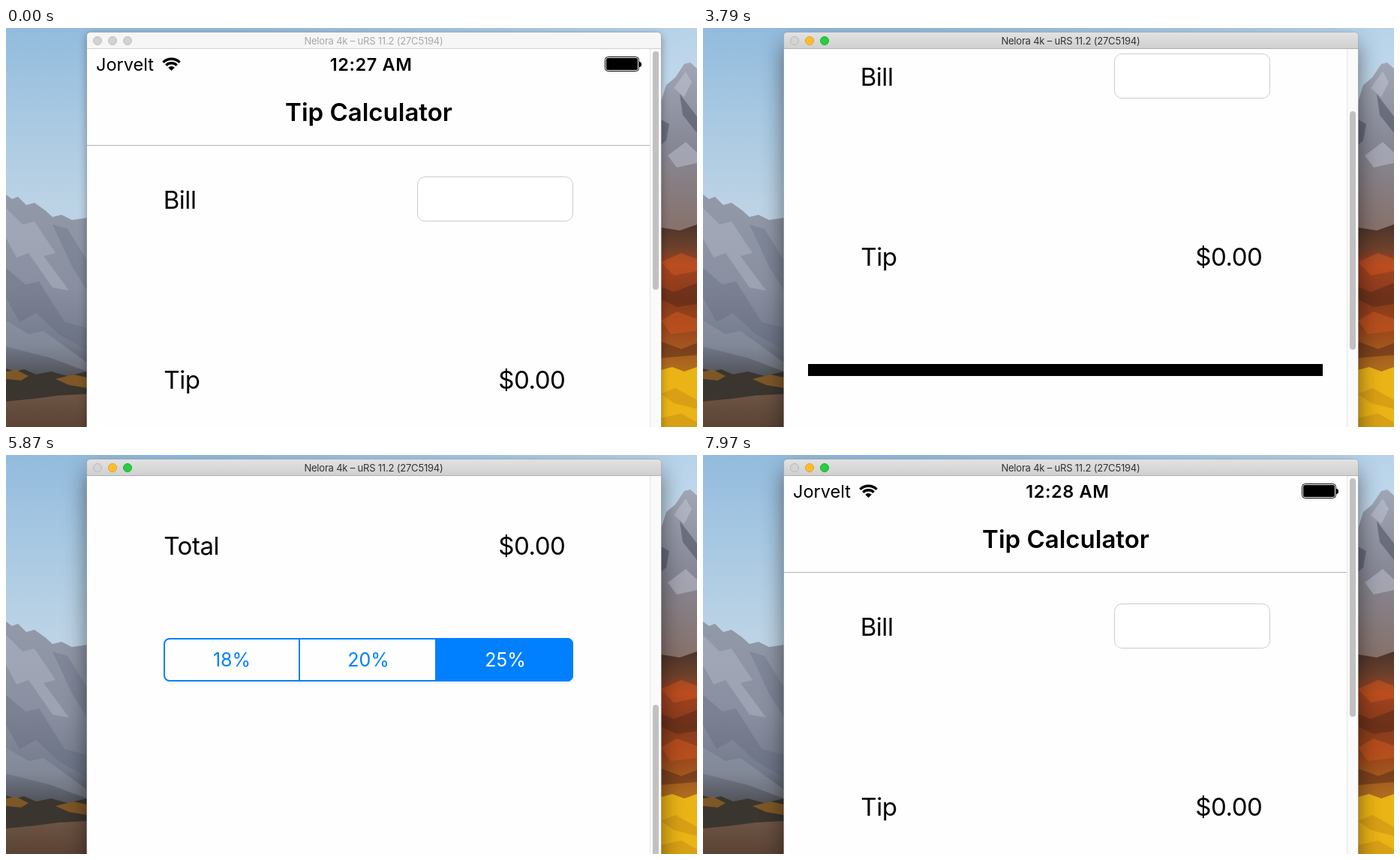
Write an HTML page that moves like this. It is 921x532 px and loops after 8000 ms.

```html
<!DOCTYPE html>
<html lang="en">
<head>
<meta charset="utf-8">
<title>Tip Calculator</title>
<style>
  html, body { margin: 0; width: 100%; height: 100%; overflow: hidden; }
  svg { display: block; width: 921px; height: 532px; font-family: Inter, Roboto, sans-serif; }
  .body { font-size: 33px; letter-spacing: -.45px; }
  .head { font-size: 33px; font-weight: 600; }
  .status { font-size: 23.5px; }
  .clock { font-weight: 600; letter-spacing: .6px; }
  .seg { font-size: 25px; fill: #0080ff; }
  .bar { font-size: 13px; letter-spacing: -.2px; }
  .mid { text-anchor: middle; }
  .end { text-anchor: end; }
</style>
</head>
<body>
<svg viewBox="0 0 921 532">
  <defs>
    <linearGradient id="sky" x2="0" y2="1">
      <stop offset="0" stop-color="#92bbdd"/><stop offset=".2" stop-color="#a6c7e2"/>
      <stop offset=".45" stop-color="#bcd3e5"/>
    </linearGradient>
    <linearGradient id="haze">
      <stop offset=".3" stop-color="#fff" stop-opacity="0"/><stop offset="1" stop-color="#fff" stop-opacity=".35"/>
    </linearGradient>
    <linearGradient id="peak" x2="0" y2="1">
      <stop offset="0" stop-color="#9299a8"/><stop offset=".5" stop-color="#898fa0"/>
      <stop offset=".8" stop-color="#747b8c"/><stop offset="1" stop-color="#4c4d52"/>
    </linearGradient>
    <linearGradient id="ground" x2="0" y2="1">
      <stop offset="0" stop-color="#6d5444"/><stop offset="1" stop-color="#5a4335"/>
    </linearGradient>
    <linearGradient id="cliff" x2="0" y2="1">
      <stop offset="0" stop-color="#a0a6b6"/><stop offset=".5" stop-color="#868795"/>
      <stop offset="1" stop-color="#87716a"/>
    </linearGradient>
    <linearGradient id="slope" x2="0" y2="1">
      <stop offset="0" stop-color="#4b342a"/><stop offset=".15" stop-color="#6b402c"/>
      <stop offset=".28" stop-color="#a3421f"/><stop offset=".5" stop-color="#873a1b"/>
      <stop offset=".7" stop-color="#9a451c"/><stop offset="1" stop-color="#b0701f"/>
    </linearGradient>
    <linearGradient id="chrome" x2="0" y2="1">
      <stop offset="0" stop-color="#e2e2e2"/><stop offset="1" stop-color="#d0d0d0"/>
    </linearGradient>
    <filter id="blurIdle" x="-20%" y="-20%" width="140%" height="140%"><feGaussianBlur stdDeviation="6"/></filter>
    <filter id="blurLive" x="-20%" y="-20%" width="140%" height="140%"><feGaussianBlur stdDeviation="15"/></filter>
    <clipPath id="view"><rect x="108" y="28" width="765" height="504"/></clipPath>
  </defs>

  <g id="scenery">
    <rect width="921" height="532" fill="url(#sky)"/>
    <rect width="921" height="532" fill="url(#haze)"/>
    <path d="M0 222 8 228 16 225 27 236 38 233 52 243 62 252 74 249 88 256 108 253V470H0Z" fill="url(#peak)"/>
  </g>

  <rect id="idleShade" x="108" y="9" width="765" height="560" rx="5" opacity=".35" filter="url(#blurIdle)"/>
  <rect id="liveShade" x="108" y="22" width="765" height="560" rx="5" opacity=".5" filter="url(#blurLive)"/>

  <path d="M107.500 540V11a5.500 5.500 0 0 1 5.500-5.500H868a5.500 5.500 0 0 1 5.500 5.500V540" fill="#fefefe" stroke="#000" stroke-opacity=".2"/>
  <path id="titleBar" d="M108 27V11a5 5 0 0 1 5-5H868a5 5 0 0 1 5 5V27Z"/>
  <path id="barEdge" d="M108 27.500H873"/>
  <g id="lights"></g>
  <text id="caption" class="bar mid" x="490" y="22">Nelora 4k – uRS 11.2 (27C5194)</text>

  <g clip-path="url(#view)">
    <g id="page">
      <text class="status" x="120" y="57">Jorvelt</text>
      <g id="wifi" fill="none" stroke="#000" stroke-width="3.400"></g>
      <text id="clock" class="status clock end" x="541.500" y="57"></text>
      <rect x="798.500" y="38.500" width="45" height="19" rx="4" fill="none" stroke="#000"/>
      <rect x="800" y="40" width="42" height="16" rx="2.500"/>
      <path d="M844 45q3 0 3 3.500t-3 3.500Z"/>
      <text class="head mid" x="483.500" y="124">Tip Calculator</text>
      <path d="M108 156.500H858" stroke="#b3b3b3"/>
      <text class="body" x="209.700" y="241">Bill</text>
      <rect x="548.500" y="198.500" width="207" height="59" rx="10" fill="#fff" stroke="#cbcbcb"/>
      <text class="body" x="210.300" y="481">Tip</text>
      <text class="body end" x="745.500" y="481">$0.00</text>
      <rect x="140" y="612" width="686" height="16"/>
      <text class="body" x="210.300" y="751">Total</text>
      <text class="body end" x="745.500" y="751">$0.00</text>
      <g fill="none" stroke="#0080ff" stroke-width="2">
        <rect x="211" y="863" width="544" height="56" rx="7"/>
        <path d="M391 863V919"/>
        <path d="M573 863H748a7 7 0 0 1 7 7V912a7 7 0 0 1-7 7H573Z" fill="#0080ff"/>
      </g>
      <text class="seg mid" x="301" y="900">18%</text>
      <text class="seg mid" x="483" y="900">20%</text>
      <text class="seg mid" x="665.500" y="900" style="fill:#fff">25%</text>
    </g>
    <rect x="858" y="28" width="15" height="504" fill="#fafafa"/>
    <path d="M858.500 28V532" stroke="#e6e6e6"/>
    <rect id="thumb" x="862" width="8" height="318" rx="4" fill="#c1c1c1"/>
  </g>
</svg>
<script>
const LOOP = 8000, WAKE = 500;
// [time, scroll offset]: the screen holds each offset until the next
const scroll = [[0, 0], [2890, 11], [3040, 46], [3790, 164], [3930, 276], [4380, 279],
  [4530, 350], [4680, 551], [4830, 608], [4980, 619], [5870, 618], [6020, 616],
  [6320, 615], [6470, 614], [7520, 514], [7670, 300], [7820, 97], [7970, 0]];

const $ = id => document.getElementById(id);
const set = (el, attrs) => { for (const k in attrs) el.setAttribute(k, attrs[k]); return el; };
const add = (parent, tag, attrs) =>
  parent.appendChild(set(document.createElementNS('http://www.w3.org/2000/svg', tag), attrs));
const shape = (d, fill, opacity = 1) => add($('scenery'), 'path', { d, fill, opacity });

// Left hillside
shape('M0 240 22 262 38 258 66 300 50 304 84 350 62 346 30 300 14 306 0 280Z', '#b9bfcc', .4);
shape('M0 320 26 342 44 338 78 392 108 400V430L70 408 40 380 18 392 0 360Z', '#5a6274', .3);
shape('M62 262 82 268 108 310V350L88 318Z', '#5f687b', .3);
shape('M0 390 30 408 50 404 108 446V458L60 440 0 425Z', '#a3a9b7', .3);
shape('M0 454 12 458 24 455 40 462 60 458 82 464 108 458V500H0Z', '#3a352f');
shape('M0 458 14 456 30 464 20 470 0 468ZM66 468 90 462 108 466V480L84 476Z', '#8f5f25', .8);
shape('M0 498 40 494 70 490 108 488V532H0Z', 'url(#ground)');

// Right hillside
shape('M873 98 880 76 892 66 904 48 912 46 921 54V270H873Z', 'url(#cliff)');
shape('M873 122 884 128 880 150 873 156ZM898 88 921 118V140L902 116Z', '#454b5b', .5);
shape('M890 80 906 58 914 72 904 92ZM882 170 906 152 921 166V180L894 186Z', '#c5cbd8', .45);
shape('M873 266 898 270 921 262V460H873Z', 'url(#slope)');
shape('M873 345 890 352 921 340V368L894 372 873 362ZM873 418 900 428 921 420V436L873 440Z', '#54291a', .5);
shape('M873 312 900 300 921 308V324L890 330ZM873 390 894 378 921 388V404L886 408Z', '#d3581f', .5);
shape('M873 456 888 452 904 458 921 452V532H873Z', '#eab316');
shape('M873 488 892 480 921 496V508L890 500ZM873 520 900 514 921 526V532H873Z', '#c88d12', .5);

// Wi-Fi fan
const fan = r => {
  const k = r * Math.SQRT1_2;
  return `M${220.5 - k} ${57 - k}A${r} ${r} 0 0 1 ${220.5 + k} ${57 - k}`;
};
[15.7, 10.2].forEach(r => add($('wifi'), 'path', { d: fan(r) }));
add($('wifi'), 'path', { d: fan(6) + 'L220.5 57Z', fill: '#000', stroke: 'none' });

const lights = [122, 142, 162].map(cx => add($('lights'), 'circle', { cx, cy: 17, r: 5.5 }));
const liveFill = ['#d4d4d4', '#ffbd2e', '#28cd41'];
const liveEdge = ['#b9b9b9', '#e0a128', '#1fae32'];

function draw(t) {
  const live = t >= WAKE;
  const y = scroll.filter(([at]) => at <= t).pop()[1];

  set($('idleShade'), { visibility: live ? 'hidden' : 'visible' });
  set($('liveShade'), { visibility: live ? 'visible' : 'hidden' });
  set($('titleBar'), { fill: live ? 'url(#chrome)' : '#f6f6f6' });
  set($('barEdge'), { stroke: live ? '#b1b1b1' : '#d1d1d1' });
  set($('caption'), { fill: live ? '#333' : '#a9a9a9' });
  lights.forEach((dot, i) => set(dot, {
    fill: live ? liveFill[i] : '#d2d2d2',
    stroke: live ? liveEdge[i] : '#c0c0c0'
  }));

  set($('page'), { transform: `translate(0 ${-y})` });
  set($('thumb'), { y: Math.round(31 + y * .488) });
  $('clock').textContent = t < 5000 ? '12:27 AM' : '12:28 AM';
}

const start = performance.now();
(function tick() {
  draw((performance.now() - start) % LOOP);
  requestAnimationFrame(tick);
})();
</script>
</body>
</html>
```
